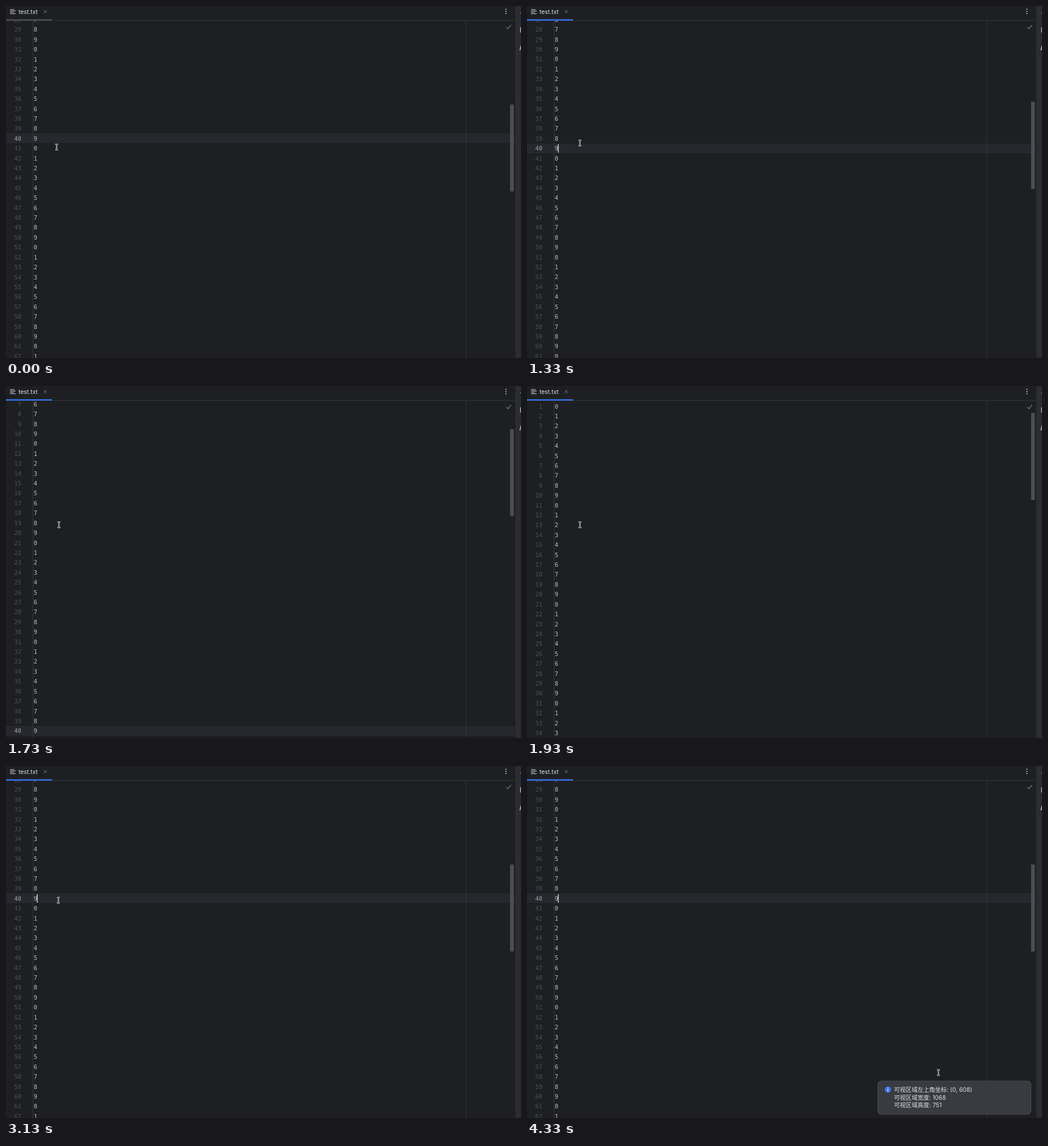
An HTML page with a canvas for the animation above (4400 ms loop, 905 by 619 pixels).

```html
<!DOCTYPE html>
<html lang="zh-CN">
<head>
<meta charset="utf-8">
<title>test.txt</title>
<style>
html, body { margin: 0; width: 100%; height: 100%; overflow: hidden; background: #1e1f22; }
canvas { display: block; width: 905px; height: 619px; }
</style>
</head>
<body>
<canvas id="stage"></canvas>
<script>
const W = 905, H = 619, LOOP = 4400, TICK = 1000 / 15;
const LINE = 17.41, FIRST = 35.7, TOP = 26, HOME = 481.7;
const CARET_LINE = 40;
const MONO = '10.3px "DejaVu Sans Mono", monospace';
const UI = '10.3px Inter, "Noto Sans CJK SC", "Noto Sans CJK", sans-serif';
const BLUE = '#3574f0', EDGE = '#34363a';

const canvas = document.getElementById('stage');
const dpr = window.devicePixelRatio || 1;
canvas.width = W * dpr;
canvas.height = H * dpr;
const c = canvas.getContext('2d');

// Keys are [time, value, ...]; values between keys are linear.
const SCROLL = [[1267, HOME], [1333, 465], [1400, 412], [1467, 345.3], [1600, 232],
  [1733, 109.5], [1800, 2], [1867, 0.6], [1933, 0], [3132, 0], [3133, HOME]];
const MOUSE = [[0, 89, 248], [67, 89, 246.5], [267, 91, 240], [467, 92, 236.6],
  [1267, 92, 236.6], [1333, 93, 241], [1467, 93, 243], [1733, 93, 244], [2067, 93, 244],
  [2133, 92.7, 240], [2200, 92.3, 236.3], [2600, 92.3, 236.3], [2667, 92, 236],
  [3933, 92, 236], [4000, 125, 252], [4067, 235, 305], [4133, 400, 384],
  [4200, 570, 466], [4267, 683, 520], [4333, 723, 539]];
const POPUP = [[3133, 0], [3267, 1]];

function at(keys, t, i = 1) {
  if (t <= keys[0][0]) return keys[0][i];
  for (let k = 1; k < keys.length; k++) {
    const a = keys[k - 1], b = keys[k];
    if (t <= b[0]) return a[i] + (b[i] - a[i]) * (t - a[0]) / (b[0] - a[0]);
  }
  return keys[keys.length - 1][i];
}

function rect(x, y, w, h, color) {
  c.fillStyle = color;
  c.fillRect(x, y, w, h);
}

function text(s, x, y, font, color, align = 'left') {
  c.font = font;
  c.fillStyle = color;
  c.textAlign = align;
  c.fillText(s, x, y);
}

function dot(x, y, r, color) {
  c.fillStyle = color;
  c.beginPath();
  c.arc(x, y, r, 0, 7);
  c.fill();
}

function stroke(points, color, width) {
  c.strokeStyle = color;
  c.lineWidth = width;
  c.beginPath();
  points.forEach(([x, y], i) => i ? c.lineTo(x, y) : c.moveTo(x, y));
  c.stroke();
}

function caretOn(t) {
  return t >= 466 && t < 1599 || t >= 3133 && t < 3533 || t >= 3933;
}

function drawEditor(t) {
  const scroll = at(SCROLL, t);
  c.save();
  c.beginPath();
  c.rect(0, TOP, W, H - TOP);
  c.clip();

  const caretY = FIRST + (CARET_LINE - 1) * LINE - scroll;
  rect(0, Math.round(caretY - 8.8), 894, 17, '#26282e');
  rect(47, TOP, 1, H, EDGE);
  rect(807.5, TOP, 1, H, EDGE);

  const start = Math.max(1, Math.floor(scroll / LINE));
  for (let n = start; n < start + 37; n++) {
    const base = FIRST + (n - 1) * LINE - scroll + 3.8;
    text(n, 27, base, MONO, n === CARET_LINE ? '#a1a3ab' : '#4b5059', 'right');
    text((n - 1) % 10, 48.8, base, MONO, '#bcbec4');
  }
  if (caretOn(t)) rect(54.2, caretY - 7.5, 1.5, 15, '#ced0d6');
  rect(885.8, 47.5 + scroll * 0.261, 6.6, 153, '#4d4e51');
  c.restore();

  stroke([[879, 37], [882, 40], [887.5, 33.5]], '#6f737a', 1.3);
}

function drawFrame(t) {
  rect(0, 25, 894, 1, EDGE);
  rect(0, 23.3, 81, 2.4, t >= 466 ? BLUE : '#4e5157');
  [[6.3, 8], [8.8, 10], [11.2, 7], [13.6, 10]].forEach(([y, w]) => rect(7, y - 0.5, w, 1, '#ced0d6'));
  text('test.txt', 22, 13.8, UI, '#dfe1e5');
  stroke([[66.3, 7.3], [71.7, 12.7]], '#7a7d84', 0.9);
  stroke([[71.7, 7.3], [66.3, 12.7]], '#7a7d84', 0.9);
  [5.8, 9.7, 13.6].forEach(y => dot(878.5, y, 1, '#ced0d6'));

  // Edge of the side tool bar
  rect(894, 0, 11, H, '#2b2d30');
  rect(894, 0, 1, H, '#1e1f22');
  stroke([[905, 11.5], [903.8, 13]], '#ced0d6', 1);
  stroke([[905, 37.5], [904.2, 38.5], [904.2, 45.5], [905, 46.5]], '#ced0d6', 1.2);
  stroke([[905.5, 69], [903, 78]], '#ced0d6', 1.3);
}

function drawPopup(t) {
  const alpha = at(POPUP, t);
  if (!alpha) return;
  c.save();
  c.globalAlpha = alpha;
  c.beginPath();
  c.roundRect(616.5, 554, 269, 58.5, 6);
  c.fillStyle = '#393b40';
  c.fill();
  c.strokeStyle = '#4a4c51';
  c.lineWidth = 1;
  c.stroke();
  dot(634.2, 569, 5.6, BLUE);
  rect(633.5, 568, 1.4, 4, '#fff');
  rect(633.5, 565.5, 1.4, 1.5, '#fff');
  ['可视区域左上角坐标: (0, 608)', '可视区域宽度: 1068', '可视区域高度: 751']
    .forEach((s, i) => text(s, 645, 573 + i * 13.6, UI, '#dfe1e5'));
  c.restore();
}

function drawMouse(t) {
  const x = at(MOUSE, t), y = at(MOUSE, t, 2);
  if (t >= 466 && t < 666) {
    c.strokeStyle = 'rgba(140,142,148,.45)';
    c.lineWidth = 1;
    c.beginPath();
    c.arc(x, y, 9, 0, 7);
    c.stroke();
  }
  const beam = (color, width) => {
    stroke([[x, y - 5], [x, y + 5]], color, width);
    for (const s of [-1, 1])
      stroke([[x - 2.4, y + 5.2 * s], [x, y + 4.5 * s], [x + 2.4, y + 5.2 * s]], color, width);
  };
  beam('#d5d6d8', 2.3);
  beam('#1e1f22', 0.7);
}

function draw(now) {
  const t = Math.floor((now % LOOP + 4) / TICK) * TICK + 0.5;
  c.setTransform(dpr, 0, 0, dpr, 0, 0);
  rect(0, 0, W, H, '#1e1f22');
  drawEditor(t);
  drawFrame(t);
  drawPopup(t);
  drawMouse(t);
}

const begin = performance.now();
function loop() {
  draw(performance.now() - begin);
  requestAnimationFrame(loop);
}
loop();
</script>
</body>
</html>
```
